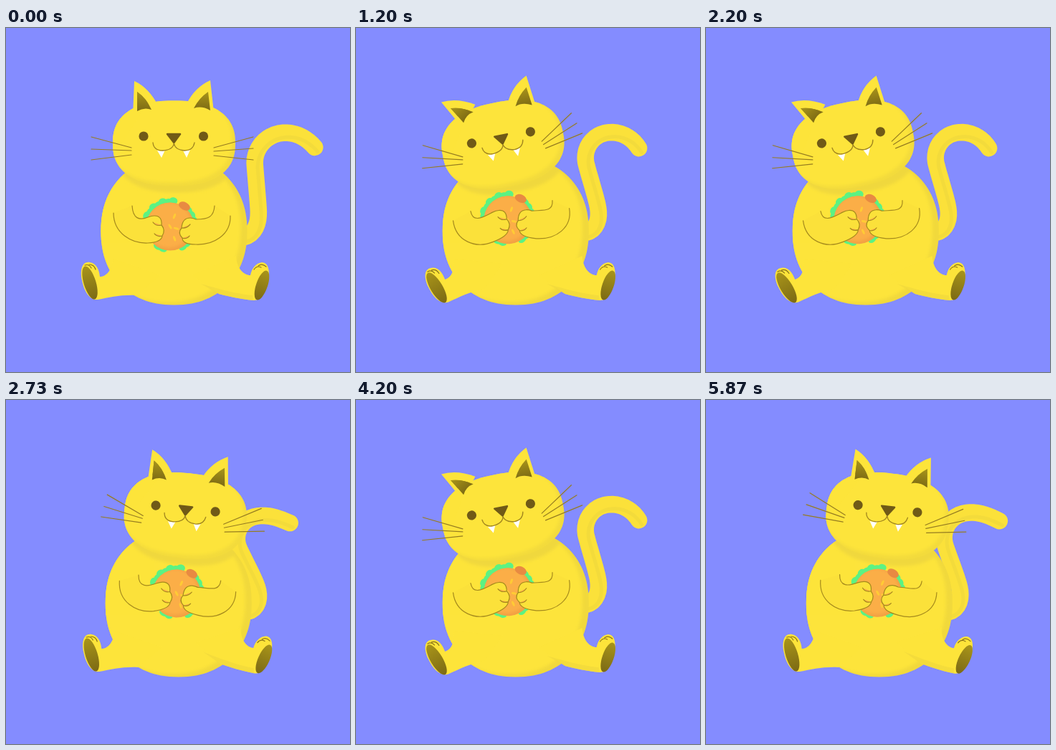
Animation, 480 px wide and 480 px high, one loop 5.94 s. Source, as an HTML page:

```html
<!DOCTYPE html>
<html lang="en">
<head>
<meta charset="utf-8">
<title>Dancing cat</title>
<style>
  html, body { margin: 0; width: 100%; height: 100%; overflow: hidden; background: #848cff; }
  svg { display: block; width: 100vw; height: 100vh; }
</style>
</head>
<body>
<svg viewBox="0 0 480 480" fill="none" stroke-linecap="round" stroke-linejoin="round">
  <defs>
    <path id="skull"/>
    <path id="belly"/>
    <circle id="bun" cx="229" cy="277" r="33.5"/>
    <clipPath id="inSkull"><use href="#skull"/></clipPath>
    <clipPath id="inBelly"><use href="#belly"/></clipPath>
    <clipPath id="inBun"><use href="#bun"/></clipPath>
    <filter id="soft" x="-10%" y="-10%" width="120%" height="120%"><feGaussianBlur stdDeviation="2"/></filter>
    <linearGradient id="dark" x1="0" y1="0" x2="0" y2="1">
      <stop offset="0" stop-color="#a8941a"/><stop offset="1" stop-color="#7c6a14"/>
    </linearGradient>
  </defs>
  <rect width="480" height="480" fill="#848cff"/>

  <path id="tail" stroke="#fbe13a" stroke-width="23.5"/>
  <path id="tailShade" stroke="#efd73c" stroke-width="5" opacity=".6" transform="translate(4 6)"/>

  <g id="torso">
    <use href="#belly" fill="#f1d93c"/>
    <g clip-path="url(#inBelly)">
      <use href="#belly" x="-9" y="-4" fill="#fde43a" filter="url(#soft)"/>
      <path d="M130 180H200V300H130Z" fill="#fde43a"/>
      <g id="chinShade"><use href="#skull" x="3" y="9" fill="#f0d83c" filter="url(#soft)"/></g>
    </g>
  </g>

  <g id="legL">
    <path fill="#fde43a" d="M150 322C147 340 139 347 131 347C130 337 126 328 117 327C106 325 103 338 106 352C109 368 117 380 128 379C145 376 160 372 182 373L215 345Z"/>
    <ellipse cx="117" cy="355.500" rx="8.500" ry="24" transform="rotate(-17 117 355.500)" fill="url(#dark)"/>
    <path stroke="#8a741a" stroke-width="1.200" d="M110 331Q116 329 119 335M116 330Q123 330 125 337"/>
  </g>
  <g id="legR">
    <path fill="#fde43a" d="M321 318C322 336 332 345 341 345C343 335 349 328 357 327C367 327 369 341 365 356C362 370 355 381 345 380C326 378 312 375 297 371L260 345Z"/>
    <path fill="#f1d93c" d="M345 380C326 378 312 375 297 371L272 357C290 362 320 371 344 373Z" opacity=".7"/>
    <ellipse cx="357" cy="359" rx="8" ry="21.500" transform="rotate(19 357 359)" fill="url(#dark)"/>
    <path stroke="#8a741a" stroke-width="1.200" d="M346 337Q350 331 356 334M352 332Q357 328 363 333"/>
  </g>

  <g id="head">
    <g id="earL">
      <path d="M177 122L179 74Q199 83 212 108Z" fill="#fde43a"/>
      <path d="M183 89L183 116Q193 110 203 114Q196 98 183 89Z" fill="url(#dark)"/>
    </g>
    <path d="M290 118L285 73Q263 83 252 106Z" fill="#fde43a"/>
    <use href="#skull" fill="#f3db3c"/>
    <g clip-path="url(#inSkull)">
      <use href="#skull" x="-5" y="-5" fill="#fde43a" filter="url(#soft)"/>
      <path d="M146 100H200L150 180Z" fill="#fde43a"/>
    </g>
    <g id="earTipL"><path d="M183 89L183 116Q193 110 203 114Q196 98 183 89Z" fill="url(#dark)"/></g>
    <path d="M282 89L285 115Q273 108 262 112Q269 98 282 89Z" fill="url(#dark)"/>
    <g fill="#705a17">
      <circle cx="192" cy="151" r="6.600"/><circle cx="275.500" cy="151" r="6.600"/>
      <path d="M225 148H243L234.300 160Z" stroke="#705a17" stroke-width="2.500"/>
    </g>
    <path fill="#fff" d="M211 171Q217 173 222 170L217 181ZM247 171Q252 172 257 170L252 181Z"/>
    <path stroke="#a0851e" stroke-width="1.300" d="M205 160Q206 171 219 171Q233 170 234.300 161Q236 170 249 171Q261 171 263 160"/>
    <g stroke="#957c20" stroke-width="1.200">
      <path id="whiskL" d="M119 152L175 167M119 169L175 171M119 184L175 177"/>
      <path id="whiskR" d="M345 152L290 167M345 168L290 172M345 184L290 178"/>
    </g>
  </g>

  <g id="burger">
    <g id="lettuce" fill="#5cf283"></g>
    <use href="#bun" fill="#f2a043"/>
    <g clip-path="url(#inBun)"><circle cx="227" cy="275" r="32" fill="#fbae46" filter="url(#soft)"/></g>
    <ellipse cx="249" cy="248.500" rx="8.500" ry="5.500" transform="rotate(28 249 248.500)" fill="#e88a42"/>
    <g id="seeds" fill="#ffcb35"></g>
  </g>
  <g id="arms" stroke="#a58a1c" stroke-width="1.200"></g>
</svg>
<script>
const LOOP = 5940, FPS = 15, BEAT = 15, TAU = Math.PI * 2;
const el = id => document.getElementById(id);
const range = (n, f) => Array.from({ length: n }, (_, i) => f(i));

// Prefix a: point follows the arm, h: follows the paw, m: halfway between.
const armShapes = [
  'M a150,258 C a150,287 a176,301 m198,300 Q h217,299 h218,290 Q h223,282 h217,275 Q h218,262 h207,262 Q h203,262 h198,264 C h186,269 a177,266 a176,248 M h218,290 Q h211,292 h207,287 M h217,275 Q h209,277 h205,271',
  'M a313,262 C a314,289 a289,303 m265,302 Q h246,302 h246,293 Q h239,286 h245,279 Q h246,265 h257,265 Q h261,265 h265,267 C h282,267 a290,264 a291,248 M h246,293 Q h252,295 h256,290 M h245,279 Q h252,280 h257,274'
];
const armPaths = armShapes.map(() =>
  el('arms').appendChild(document.createElementNS('http://www.w3.org/2000/svg', 'path')));
armPaths.forEach(path => path.setAttribute('fill', '#fbe13a'));

function superellipse(cx, cy, rx, ry, n) {
  const bulge = v => Math.sign(v) * Math.abs(v) ** (2 / n);
  return 'M' + range(120, i => {
    const a = i / 120 * TAU;
    return [cx + rx * bulge(Math.cos(a)), cy + ry * bulge(Math.sin(a))].map(v => v.toFixed(2));
  }).join('L') + 'Z';
}
el('skull').setAttribute('d', superellipse(234.5, 161, 85.5, 59.5, 2.4));
el('belly').setAttribute('d', superellipse(234.5, 283.5, 102, 103, 2.2));

const leaf = (deg, r, rx, ry) => {
  const a = deg * TAU / 360;
  return `<ellipse cx="${r}" rx="${rx}" ry="${ry}" transform="translate(229 277) rotate(${deg})"/>`;
};
el('lettuce').innerHTML =
  range(8, i => leaf(193 + i * 12, 34 + i % 2 * 2, 5, 6)).join('') +
  range(3, i => leaf(-42 + i * 14, 34, 5, 6)).join('') +
  range(2, i => leaf(44 + i * 14, 34, 4, 6) + leaf(122 - i * 14, 33, 4, 6)).join('');
el('seeds').innerHTML = range(7, i => leaf(i * 137.5 - 120, 9 * Math.sqrt(i), 4, 1.6)).join('');

// The tail is a chain whose headings combine a resting hook with a lagging lift.
function tailPath(p, lean) {
  const lift = peak => Math.tanh(1.5 * (1 + Math.cos(TAU * (p - peak))));
  const steps = 40, size = (229 - 20 * lift(.55)) / steps;
  let x = 331 + 10 * lean, y = 292 + 6 * lean, d = `M${x} ${y}`;
  for (let i = 0; i < steps; i++) {
    const s = (i + .5) / steps;
    const rest = 93 - 1350 * Math.max(0, .25 - s) ** 2 - 310 * Math.max(0, s - .485);
    const sway = 24 * Math.max(0, Math.sin(s / .75 * Math.PI)) * lift(.55);
    const curl = 45 * s ** 8 * lift(.62);
    const a = (rest + sway + curl) * TAU / 360;
    x += size * Math.cos(a);
    y -= size * Math.sin(a);
    d += `L${x.toFixed(2)} ${y.toFixed(2)}`;
  }
  return d;
}

function rotate(x, y, deg, cx, cy) {
  const a = deg * TAU / 360, c = Math.cos(a), s = Math.sin(a);
  return [cx + (x - cx) * c - (y - cy) * s, cy + (x - cx) * s + (y - cy) * c];
}

function draw(p) {
  const lean = -Math.cos(TAU * (p - .28)) - .187;
  const bob = 6.2 * (Math.cos(2 * TAU * p) - 1) + 1.7 * Math.sin(2 * TAU * p);
  const left = Math.min(lean, 0), right = Math.max(lean, 0);
  const move = (id, x, y, a = 0, cx = 0, cy = 0) =>
    el(id).setAttribute('transform', `translate(${x} ${y}) rotate(${a} ${cx} ${cy})`);

  move('torso', 11 * lean, 0);
  move('chinShade', 0, 0, 10.5 * lean, 234, 247);
  move('head', 12 * lean, 0, 10.5 * lean, 234, 247);
  for (const id of ['earL', 'earTipL']) move(id, 0, 0, 29 * left, 193, 112);
  move('whiskL', 0, 0, -1.2 * bob, 175, 172);
  move('whiskR', 0, 0, 1.7 * bob, 290, 172);
  move('legL', 4 * lean, 0, 13 * left, 145, 360);
  move('legR', 5 * lean, 0, 9 * right, 330, 360);
  move('burger', 16 * lean, .9 * bob, 4 * lean, 229, 277);

  const tail = tailPath(p, lean);
  el('tail').setAttribute('d', tail);
  el('tailShade').setAttribute('d', tail);

  armShapes.forEach((shape, i) => {
    const squeeze = (i ? .6 : -.6) * bob;
    const place = (kind, x, y) => {
      const arm = rotate(x, y, 7 * lean, 232, 285);
      const paw = rotate(x, y, 4 * lean, 229, 277);
      const k = { a: 0, m: .5, h: 1 }[kind];
      return [
        arm[0] + 11 * lean + k * (paw[0] - arm[0] + lean + squeeze),
        arm[1] + k * (paw[1] - arm[1] + .9 * bob)
      ];
    };
    armPaths[i].setAttribute('d',
      shape.replace(/([amh])(\d+),(\d+)/g, (_, kind, x, y) => place(kind, +x, +y)));
  });
}

const start = performance.now();
function tick() {
  const t = (performance.now() - start) % LOOP;
  const step = Math.min(88, Math.floor(t * FPS / 1000));
  draw(step % BEAT / BEAT);
  requestAnimationFrame(tick);
}
tick();
</script>
</body>
</html>
```
